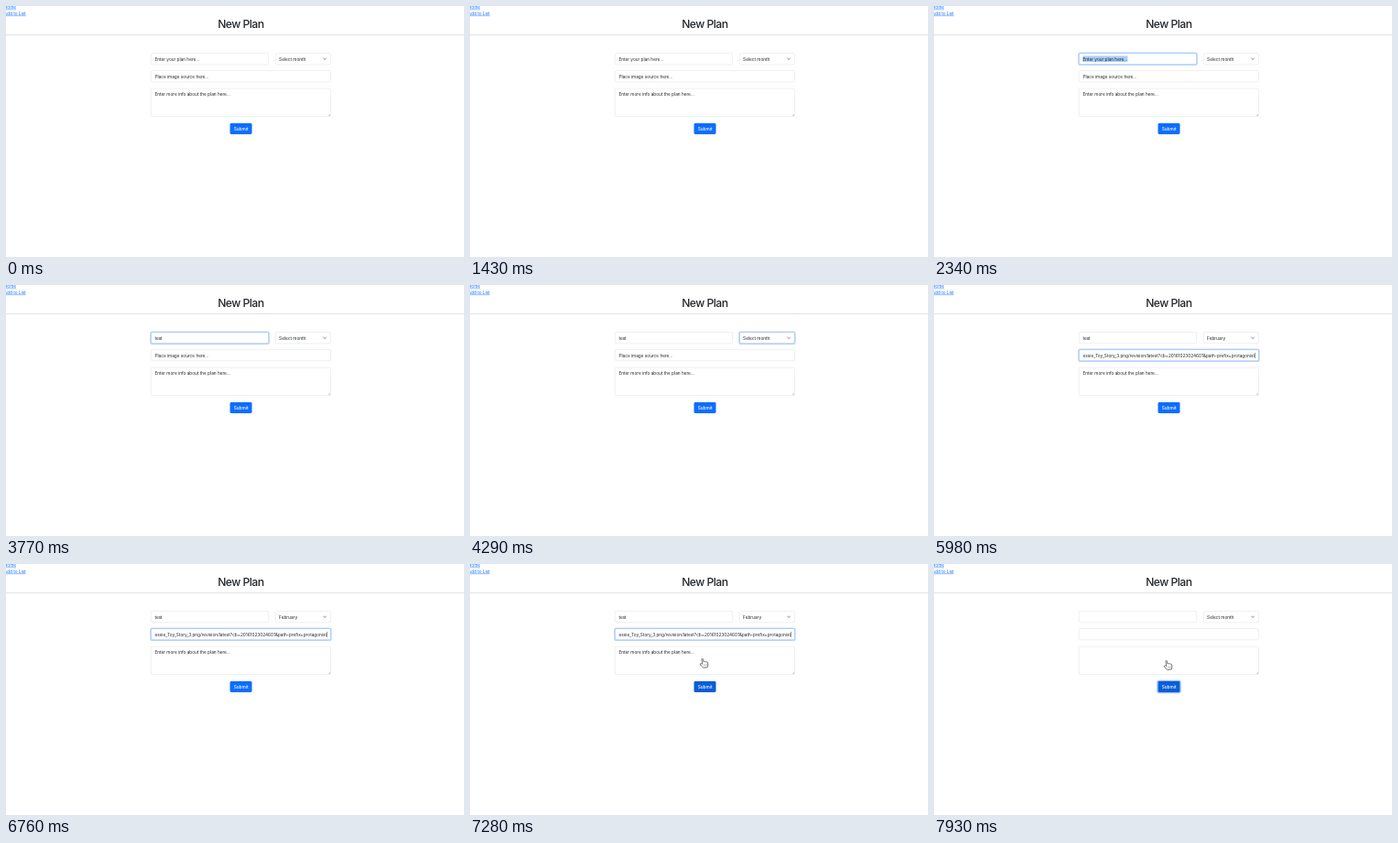
Write an HTML page with a canvas that moves like this. It is 500 by 274 pixels and loops after 8000 ms.

```html
<!DOCTYPE html>
<html lang="en">
<head>
<meta charset="utf-8">
<title>New Plan</title>
<style>
  html, body { margin: 0; width: 100%; height: 100%; overflow: hidden; background: #fff; }
  canvas { display: block; width: 500px; height: 274px; }
</style>
</head>
<body>
<canvas id="stage"></canvas>
<script>
const LOOP = 8000, STEP = 130;
const INK = '#212529', BLUE = '#0d6efd';
const URL_TEXT = 'Jessie_Toy_Story_3.png/revision/latest?cb=20161023024601&path-prefix=protagonist';

const plan = { x: 158.3, y: 51.6, w: 128.4, h: 12.2 };
const month = { x: 294.3, y: 51.6, w: 60.2, h: 12.2 };
const image = { x: 158.3, y: 70.6, w: 196.2, h: 12.2 };
const info = { x: 158.3, y: 90.2, w: 196.2, h: 30.4 };
const submit = { x: 244.5, y: 128, w: 24, h: 12 };

const canvas = document.getElementById('stage');
const ctx = canvas.getContext('2d');
const ratio = window.devicePixelRatio || 1;
canvas.width = Math.round(500 * ratio);
canvas.height = Math.round(274 * ratio);

const clamp = v => Math.max(0, Math.min(1, v));

// Focus strength: fades in from start, fades out from end
function focus(t, start, end) {
  const fade = from => t < from ? 0 : clamp((t - from + 60) / 150);
  return fade(start) * (1 - fade(end));
}

function setFont(size = 4.75, weight = 400, spacing = -0.02) {
  ctx.font = `${weight} ${size}px Inter, sans-serif`;
  ctx.letterSpacing = spacing + 'px';
}

function text(str, x, y, color = INK, align = 'left') {
  ctx.fillStyle = color;
  ctx.textAlign = align;
  ctx.fillText(str, x, y);
}

function roundBox(b, grow = 0) {
  ctx.beginPath();
  ctx.roundRect(b.x - grow, b.y - grow, b.w + 2 * grow, b.h + 2 * grow, 1.4 + grow);
}

function line(color, width, ...points) {
  ctx.beginPath();
  points.forEach(([x, y]) => ctx.lineTo(x, y));
  ctx.strokeStyle = color;
  ctx.lineWidth = width;
  ctx.stroke();
}

function ring(b, strength) {
  if (!strength) return;
  ctx.save();
  ctx.globalAlpha = strength;
  roundBox(b, 0.5);
  ctx.strokeStyle = 'rgba(13,110,253,.25)';
  ctx.lineWidth = 1.3;
  ctx.stroke();
  roundBox(b);
  ctx.strokeStyle = '#86b7fe';
  ctx.lineWidth = 0.4;
  ctx.stroke();
  ctx.restore();
}

function field(b, strength = 0) {
  roundBox(b);
  ctx.fillStyle = '#fff';
  ctx.fill();
  ctx.strokeStyle = '#d3d8dd';
  ctx.lineWidth = 0.4;
  ctx.stroke();
  ring(b, strength);
}

function caret(x, y) {
  line(INK, 0.5, [x, y - 4.7], [x, y + 1.4]);
}

function value(str, b, { selected = false, cursor = false } = {}) {
  const x = b.x + 4.1, y = b.y + 8;
  const width = ctx.measureText(str).width;
  if (selected) {
    ctx.fillStyle = '#abcdf8';
    ctx.fillRect(x, y - 5.1, width, 6.6);
  }
  text(str, x, y);
  if (cursor) caret(x + width + 0.3, y);
}

function link(str, y) {
  text(str, -2.2, y, BLUE);
  line(BLUE, 0.45, [-2.2, y + 0.8], [ctx.measureText(str).width - 2.2, y + 0.8]);
}

function hand(x, y) {
  ctx.save();
  ctx.translate(x, y);
  ctx.rotate(-0.12);
  ctx.scale(1.05, 1.05);
  ctx.beginPath();
  ctx.moveTo(-1.5, 1.2);
  ctx.lineTo(-1.8, -4);
  ctx.quadraticCurveTo(-1.1, -5.2, -0.3, -4);
  ctx.lineTo(-0.1, -1);
  ctx.quadraticCurveTo(0.8, -1.8, 1.5, -0.8);
  ctx.quadraticCurveTo(2.4, -1.3, 2.9, -0.4);
  ctx.quadraticCurveTo(4, -0.6, 4.2, 0.6);
  ctx.quadraticCurveTo(4.5, 3, 3.2, 5.2);
  ctx.lineTo(-1, 5.2);
  ctx.quadraticCurveTo(-2, 3.4, -4, 1.6);
  ctx.quadraticCurveTo(-4, 0.2, -2.8, 0.5);
  ctx.closePath();
  ctx.fillStyle = '#fff';
  ctx.fill();
  ctx.lineJoin = 'round';
  ctx.strokeStyle = '#444';
  ctx.lineWidth = 0.65;
  ctx.stroke();
  for (const fx of [0.2, 1.6, 3]) line('#777', 0.4, [fx, 1.6], [fx, 3.8]);
  ctx.restore();
}

function header() {
  setFont();
  link('Home', 3);
  link('Add to List', 9.9);
  setFont(12.1, 500, -0.5);
  text('New Plan', 256.3, 24.2, INK, 'center');
  ctx.fillStyle = '#dedfe0';
  ctx.fillRect(0, 31, 500, 0.8);
  setFont();
}

function planText(t) {
  if (t < 2990) return 'Enter your plan here...';
  return t < 3120 ? 't' : t < 3250 ? 'tes' : 'test';
}

function draw(t) {
  ctx.setTransform(ratio, 0, 0, ratio, 0, 0);
  ctx.fillStyle = '#fff';
  ctx.fillRect(0, 0, 500, 274);
  const cleared = t >= 7930;
  header();

  field(plan, focus(t, 2080, 4160));
  if (!cleared) value(planText(t), plan, {
    selected: t >= 2340 && t < 2990,
    cursor: t >= 2990 && t < 3770
  });

  field(month, focus(t, 4160, 5460));
  text(t >= 5330 && !cleared ? 'February' : 'Select month', month.x + 3.8, month.y + 8);
  line('#343a40', 0.6, [346.3, 56.9], [348, 58.5], [349.7, 56.9]);

  field(image, focus(t, 5460, 7410));
  if (t < 5720) {
    value('Place image source here...', image, { selected: t >= 5590 });
  } else if (!cleared) {
    ctx.save();
    ctx.beginPath();
    ctx.rect(162.3, image.y, 188.6, image.h);
    ctx.clip();
    text(URL_TEXT, 350, image.y + 8, INK, 'right');
    if (t < 7410) caret(350.5, image.y + 8);
    ctx.restore();
  }

  field(info);
  if (!cleared) value('Enter more info about the plan here...', info);
  line('#888', 0.4, [352, 120], [354, 118]);
  line('#888', 0.4, [353.2, 120], [354, 119.2]);

  const hover = t >= 6890;
  roundBox(submit);
  ctx.fillStyle = hover ? '#0b5ed7' : BLUE;
  ctx.fill();
  const pressed = focus(t, 7410, LOOP);
  if (pressed) {
    roundBox(submit, 0.6);
    ctx.strokeStyle = `rgba(49,132,253,${0.5 * pressed})`;
    ctx.lineWidth = 1.3;
    ctx.stroke();
  }
  setFont(4.75, 500);
  text('Submit', 256.6, 135.8, '#fff', 'center');

  if (t >= 5330 && t < 5460) {
    ctx.fillStyle = '#999';
    ctx.fillRect(246.5, 0, 4, 0.7);
  }
  if (hover) {
    const y = t < 7280 ? 107.8 + (7280 - t) / 130 : 107.8 + 2.2 * clamp((t - 7280) / 260);
    hand(255.2, y);
  }
}

function frame(now) {
  draw(Math.floor((now % LOOP) / STEP) * STEP);
  requestAnimationFrame(frame);
}
requestAnimationFrame(frame);
</script>
</body>
</html>
```
